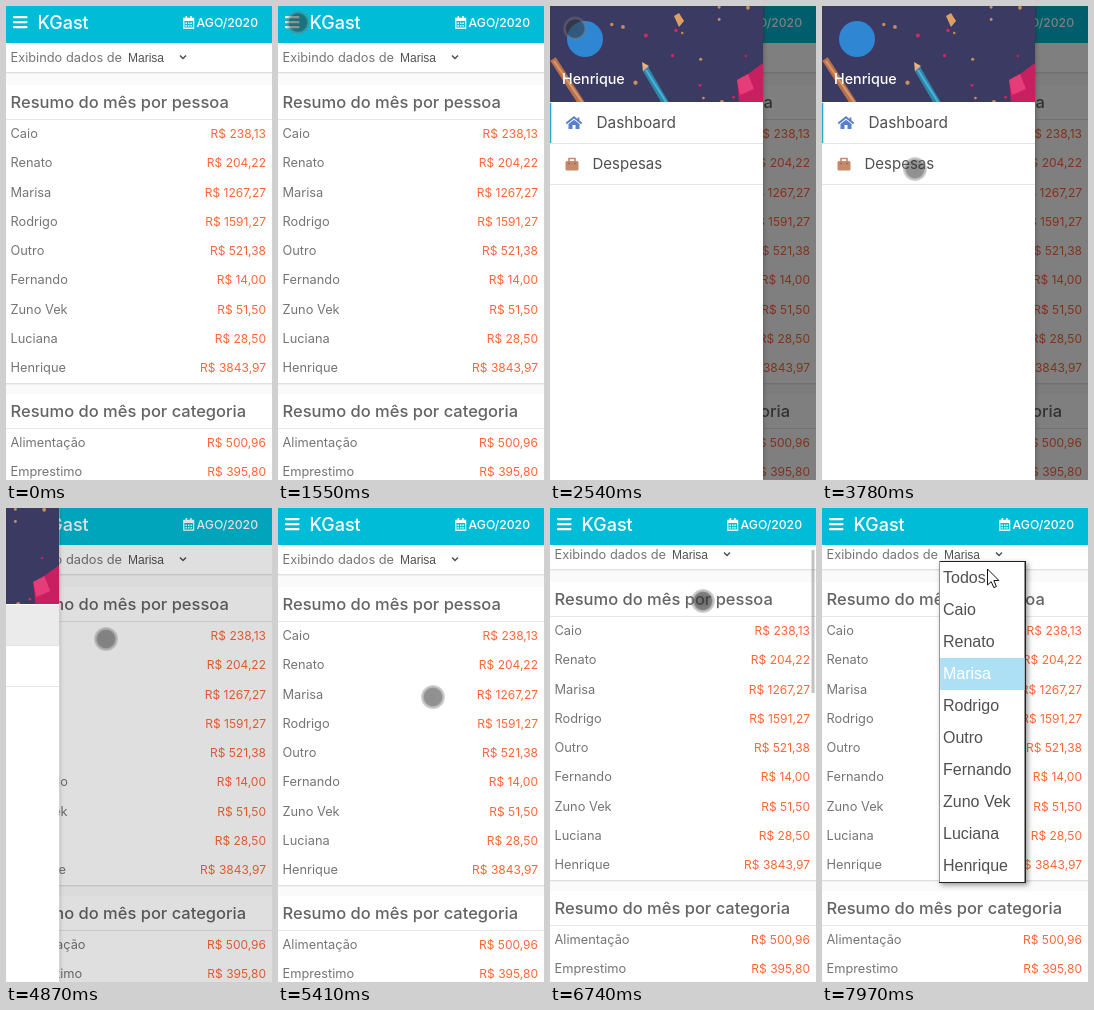
Recreate the animation shown at these times as an HTML page with a canvas. Size 266x474 px, loop 8000 ms.

```html
<!DOCTYPE html>
<html lang="pt-BR">
<head>
<meta charset="utf-8">
<title>Despesas</title>
<style>
html, body { margin: 0; width: 100%; height: 100%; overflow: hidden; background: #fafafa; }
canvas { display: block; width: 266px; height: 474px; }
</style>
</head>
<body>
<canvas id="stage"></canvas>
<script>
const W = 266, H = 474, LOOP = 8000;
const TICK = 77; // pace at which the screen refreshes while something moves
const MENU_W = 213, BANNER_H = 96;
const UI = 'Inter, "Open Sans", sans-serif';
const NATIVE = '"Liberation Sans", Arial, sans-serif';

const people = {
  'Caio': '238,13', 'Renato': '204,22', 'Marisa': '1267,27',
  'Rodrigo': '1591,27', 'Outro': '521,38', 'Fernando': '14,00',
  'Zuno Vek': '51,50', 'Luciana': '28,50', 'Henrique': '3843,97'
};
const categories = { 'Alimentação': '500,96', 'Emprestimo': '395,80' };
const selected = 'Marisa';

const canvas = document.getElementById('stage');
const c = canvas.getContext('2d');
const dpr = window.devicePixelRatio || 1;
canvas.width = W * dpr;
canvas.height = H * dpr;

const mix = (a, b, p) => a + (b - a) * p;
const easeOut = p => p * (2 - p);
const easeInOut = p => p * p * (3 - 2 * p);

// Progress from a to b in refresh-sized jumps; the first jump is at a.
function steps(t, a, b) {
  if (t < a) return 0;
  const gaps = Math.max(1, Math.round((b - a) / TICK));
  const k = Math.floor((t - a) / (b - a) * gaps + 1e-6) + 1;
  return Math.min(1, k / (gaps + 1));
}

function rect(x, y, w, h, color, r = 0) {
  c.fillStyle = color;
  c.beginPath();
  c.roundRect(x, y, w, h, r);
  c.fill();
}

function disc(x, y, r, color) {
  c.fillStyle = color;
  c.beginPath();
  c.arc(x, y, r, 0, 7);
  c.fill();
}

function trace(pts) {
  c.beginPath();
  for (let i = 0; i < pts.length; i += 2) c.lineTo(pts[i], pts[i + 1]);
}

function poly(color, ...pts) {
  trace(pts);
  c.closePath();
  c.fillStyle = color;
  c.fill();
}

function line(color, width, ...pts) {
  trace(pts);
  c.strokeStyle = color;
  c.lineWidth = width;
  c.stroke();
}

function text(s, x, y, size, color, { weight = 400, family = UI, align = 'left' } = {}) {
  c.font = `${weight} ${size}px ${family}`;
  c.textAlign = align;
  c.fillStyle = color;
  c.fillText(s, x, y);
}

function shadow(alpha, offset, paint) {
  c.save();
  c.shadowColor = `rgba(0,0,0,${alpha})`;
  c.shadowBlur = 5 * dpr;
  c.shadowOffsetX = c.shadowOffsetY = offset * dpr;
  paint();
  c.restore();
}

function panel(y, h) {
  rect(0, y, W, h, '#fff');
  rect(0, y + h - 1, W, 1, '#e0e0e0');
  rect(0, y + h, W, 1, '#f0f0f0');
}

function card(y, h, title, rows) {
  panel(y, h);
  text(title, 4.5, y + 23, 16.5, '#646464', { weight: 500 });
  rect(0, y + 34, W, 1, '#e6e6e6');
  Object.entries(rows).forEach(([name, value], i) => {
    const base = y + 53 + i * 29.25;
    text(name, 4.5, base, 12.8, '#757575');
    text('R$ ' + value, 260, base, 12, '#ff6537', { align: 'right' });
  });
}

function calendar(x, y) {
  c.strokeStyle = '#fff';
  c.lineWidth = 1.3;
  c.strokeRect(x + 0.8, y + 2.4, 9.8, 9.8);
  rect(x + 1, y + 3, 9.6, 2, '#fff');
  for (let i = 0; i < 2; i++) rect(x + 2.6 + i * 4.6, y, 1.5, 3, '#fff');
  for (let i = 0; i < 6; i++)
    rect(x + 2.5 + i % 3 * 2.5, y + 6.4 + Math.floor(i / 3) * 2.6, 1.5, 1.5, '#fff');
}

function page(scroll) {
  rect(0, 0, W, H, '#fafafa');
  c.save();
  c.translate(0, -scroll);
  panel(37, 30);
  text('Exibindo dados de', 4.5, 56, 12.8, '#757575');
  text(selected, 122, 56, 12, '#505050', { family: NATIVE });
  line('#505050', 1.5, 174, 49.5, 177, 52.5, 180, 49.5);
  card(79, 299, 'Resumo do mês por pessoa', people);
  card(388, 130, 'Resumo do mês por categoria', categories);
  c.restore();

  rect(0, 0, W, 37, '#00bcd7');
  for (let i = 0; i < 3; i++) rect(7, 10 + i * 5, 14.5, 2.3, '#fff', 1);
  text('KGast', 31.5, 23, 18, '#fff', { weight: 500 });
  calendar(177, 10);
  text('AGO/2020', 252, 21, 12.2, '#fff', { weight: 500, align: 'right' });
}

function confetti(count) {
  let seed = 11;
  const rnd = () => (seed = seed * 16807 % 2147483647) / 2147483647;
  for (let i = 0; i < 5; i++) rnd();
  for (let i = 0; i < count; i++) {
    const x = mix(60, MENU_W, rnd()), y = BANNER_H * rnd();
    disc(x, y, mix(1, 2.2, rnd()), i % 3 ? '#c98e58' : '#d8255f');
  }
}

function pencil(x, y, lean, body, shine) {
  line(body, 6.5, x, y, x + lean, BANNER_H + 2);
  line(shine, 2, x + 1, y + 2, x + lean, BANNER_H);
}

function banner() {
  c.save();
  c.beginPath();
  c.rect(0, 0, MENU_W, BANNER_H);
  c.clip();
  rect(0, 0, MENU_W, BANNER_H, '#3b3a63');
  confetti(16);
  pencil(3, 53, 29, '#b9714f', '#d99a66');
  pencil(95, 62, 21, '#2e86ad', '#49b3d3');
  poly('#e8b27a', 92, 56, 99, 60, 93, 65);
  poly('#dca163', 124, 10, 129, 7, 134, 15, 129, 21);
  poly('#c81f60', 187, 74, 198, 68, 213, 57, 213, 96, 189, 96);
  poly('#e63c78', 187, 74, 198, 68, 204, 83, 190, 89);
  c.restore();
}

function house(x, y, color) {
  line(color, 1.9, x - 7.7, y, x, y - 6.3, x + 7.7, y);
  poly(color, x - 5.5, y + 0.5, x, y - 3.7, x + 5.5, y + 0.5, x + 5.5, y + 5.5, x - 5.5, y + 5.5);
  rect(x - 1.5, y + 1.5, 3, 4, '#fff');
  rect(x + 3.6, y - 6, 1.8, 4, color);
}

function bag(x, y, color) {
  line(color, 1.6, x - 3, y, x - 3, y - 3.5, x + 3, y - 3.5, x + 3, y);
  rect(x - 6.5, y - 1, 13, 9.5, color, 1.5);
  for (const side of [-3, 3]) disc(x + side, y + 1.5, 0.8, '#8f5a42');
}

function sidebar(open, active) {
  if (open <= 0) return;
  rect(0, 0, W, H, `rgba(0,0,0,${0.5 * open})`);
  c.save();
  c.translate(-MENU_W * (1 - open), 0);
  shadow(0.35, 0, () => rect(0, 0, MENU_W, H, '#fff'));
  banner();
  disc(35, 33, 18, '#2f86d2');
  text('Henrique', 12, 77.5, 14.3, '#fff', { weight: 500 });

  rect(16, 97, MENU_W - 16, 40, `rgba(0,0,0,${0.08 * active})`);
  rect(0, 97, 1.3, 40, '#2aa9c4');
  for (const y of [137, 178]) rect(0, y, MENU_W, 1, '#e4e4e4');
  house(24, 117.5, '#5a80cc');
  text('Dashboard', 46.5, 122.3, 15.4, '#505050');
  bag(22, 156, '#c58a6c');
  text('Despesas', 42.5, 163.3, 15, '#505050');
  c.restore();
}

function dropdown() {
  const rowH = 32, top = 54;
  shadow(0.4, 2, () => rect(117, top - 1, 87, 322, '#222'));
  rect(117, top - 1, 1, 321, '#999');
  rect(118, top, 84.5, 320, '#fff');
  ['Todos', ...Object.keys(people)].forEach((name, i) => {
    const y = top + i * rowH, on = name === selected;
    if (on) rect(118, y, 84.5, rowH, '#aee0f5');
    text(name, 121, y + 21.3, 16, on ? '#fff' : '#505050', { family: NATIVE });
  });
}

function arrow(x, y) {
  c.save();
  c.translate(x, y);
  poly('#fff', 0, 0, 0, 16, 3.7, 12.6, 6.3, 18.6, 8.9, 17.5, 6.4, 11.6, 11.3, 11.4);
  c.strokeStyle = '#111';
  c.lineWidth = 1;
  c.stroke();
  c.restore();
}

function touch(x, y, pressed) {
  const r = 12, g = c.createRadialGradient(x, y, 0, x, y, r);
  g.addColorStop(0, `rgba(50,50,50,${pressed ? 0.72 : 0.55})`);
  g.addColorStop(0.72, `rgba(50,50,50,${pressed ? 0.62 : 0.53})`);
  g.addColorStop(0.82, 'rgba(110,110,110,.48)');
  g.addColorStop(1, 'rgba(130,130,130,.3)');
  disc(x, y, r, g);
}

// Each hop: start, end, x, y
const visits = [
  { shown: [470, 1010], from: [165, 393], hops: [[470, 620, 60, 236], [850, 1010, -12, 60]] },
  { shown: [1160, 7580], from: [38, 44], hops: [
    [1160, 1550, 20, 16.5],
    [2540, 3020, 113, 127],
    [3250, 3480, 103, 143],
    [3630, 3780, 93, 163],
    [4110, 4260, 100, 131],
    [5100, 5410, 155, 189],
    [5490, 5560, 144, 217],
    [6040, 6740, 153, 93],
    [6890, 7290, 155, 52]
  ] }
];
const presses = [[1770, 1930], [4490, 4560], [5790, 6200], [6740, 6890]];
const within = (t, [a, b]) => t >= a && t < b;

function pointer(t) {
  const visit = visits.find(v => within(t, v.shown));
  if (!visit) return;
  let [x, y] = visit.from;
  for (const [a, b, toX, toY] of visit.hops) {
    const p = easeInOut(steps(t, a, b));
    x = mix(x, toX, p);
    y = mix(y, toY, p);
  }
  touch(x, y, presses.some(span => within(t, span)));
}

function scrollbar(t) {
  const alpha = steps(t, 6040, 6110) * (1 - steps(t, 6890, 7290));
  rect(261.5, 42, 3, 143, `rgba(110,110,110,${0.42 * alpha})`);
}

function draw(t) {
  c.setTransform(dpr, 0, 0, dpr, 0, 0);
  page(Math.round(5 * steps(t, 6040, 6350)));
  scrollbar(t);
  const open = easeOut(steps(t, 2080, 2310)) - easeOut(steps(t, 4790, 5020));
  sidebar(open, steps(t, 4490, 4560));
  if (t >= 7580) {
    const p = steps(t, 7580, 7970);
    dropdown();
    arrow(mix(155, 165.5, p), mix(52, 61, p));
  }
  pointer(t);
}

function frame() {
  draw(performance.now() % LOOP);
  requestAnimationFrame(frame);
}
frame();
</script>
</body>
</html>
```
